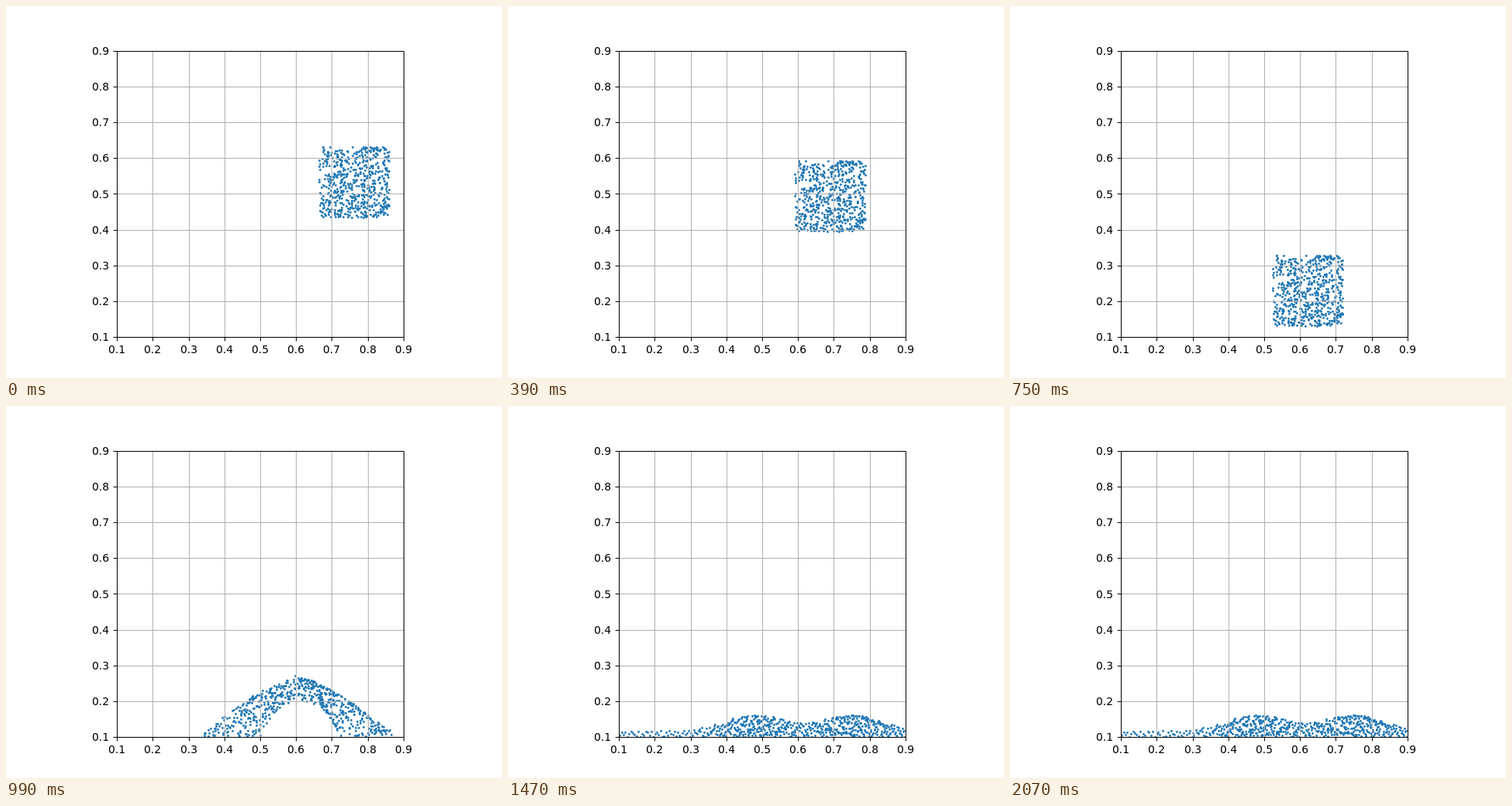
These frames come from a looping animation (640 by 480 pixels, 2100 ms). An HTML page with a canvas:

```html
<!DOCTYPE html>
<html lang="en">
<head>
<meta charset="utf-8">
<title>Falling sand block</title>
<style>
  html, body { margin: 0; width: 640px; height: 480px; overflow: hidden; background: #fff; }
  canvas, svg { position: absolute; left: 0; top: 0; display: block; }
  text { font: 13.89px "DejaVu Sans", sans-serif; fill: #000; }
</style>
</head>
<body>
<canvas id="sand" width="640" height="480"></canvas>
<svg id="axes" width="640" height="480" viewBox="0 0 640 480"></svg>
<script>
const STEP = 30, STEPS = 70, COUNT = 600;
const LEFT = 143.2, TOP = 57.6, SIZE = 369.6, RIGHT = LEFT + SIZE, FLOOR = TOP + SIZE;
const IMPACT = 26, SPLASH = 33, SLIDE = 14;
const BLOCK = { x: 403.3, y: 182, size: 92, vx: -2.6, vy: -3.186, fall: 0.3514 };
const CREST = 376, SPAN = 132;

const mix = (a, b, s) => a + (b - a) * s;
const bell = (x, mid, width) => Math.exp(-(((x - mid) / width) ** 2));
const arch = (x, mid, half, power) => Math.max(0, 1 - Math.abs((x - mid) / half) ** power);

// Axes, drawn above the grains
const axes = document.getElementById('axes');
const snap = v => Math.floor(v + 0.5) + 0.5;

function add(tag, attrs, text = '') {
  const el = document.createElementNS('http://www.w3.org/2000/svg', tag);
  for (const key in attrs) el.setAttribute(key, attrs[key]);
  el.textContent = text;
  axes.append(el);
}

const path = (d, stroke) => add('path', { d, stroke, fill: 'none' });
const x0 = snap(LEFT), x1 = snap(RIGHT), y0 = snap(TOP), y1 = snap(FLOOR);
let grid = '', ticks = '';
for (let i = 0; i <= 8; i++) {
  const x = LEFT + SIZE * i / 8, y = FLOOR - SIZE * i / 8;
  const gx = snap(x), gy = snap(y), label = ((i + 1) / 10).toFixed(1);
  grid += `M${gx} ${y0}V${y1}M${x0} ${gy}H${x1}`;
  ticks += `M${gx} ${y1}v4.86M${x0} ${gy}h-4.86`;
  add('text', { x: Math.round(x - 11), y: 448 }, label);
  add('text', { x: 111, y: Math.round(y + 5.2) }, label);
}
path(grid, '#b0b0b0');
path(ticks, '#000');
path(`M${x0} ${y0}H${x1}V${y1}H${x0}Z`, '#000');

// Heights above the floor: splash surface, hollow below it, settled heap
const surface = x => 79 * arch(x, CREST, SPAN, 1.3);
const hollow = x => 45 * arch(x, 380, 52, 2.6);
const heap = x => 8 + 21 * bell(x, 320, 55) + 22 * bell(x, 447, 54);

let seed = 20731;
function random() {
  seed = (seed + 0x6D2B79F5) | 0;
  let t = Math.imul(seed ^ seed >>> 15, 1 | seed);
  t = t + Math.imul(t ^ t >>> 7, 61 | t) ^ t;
  return ((t ^ t >>> 14) >>> 0) / 4294967296;
}

// The block's lower edge spreads over the floor, its upper edge becomes the crest
const grains = Array.from({ length: COUNT }, () => {
  const u = random(), v = random(), c = 2 * u - 1;
  const low = CREST + SPAN * Math.sign(c) * Math.abs(c) ** 0.85;
  const high = CREST + 66 * c;
  return { u, v, creep: random() < 0.4 ? 0.05 : 0,
           sx: mix(low, high, v),
           sy: FLOOR - mix(hollow(low), surface(high), v) };
});

// Settled places: grains keep their order along x and their rank in each column
const weight = x => heap(x) ** 1.5;
let total = 0;
for (let x = LEFT; x < RIGHT; x += 0.5) total += weight(x);
grains.sort((a, b) => a.sx - b.sx);
let x = LEFT, sum = 0;
grains.forEach((g, i) => {
  while (sum < total * (i + 0.5) / COUNT) {
    sum += weight(x);
    x += 0.5;
  }
  g.fx = x;
});
for (const g of grains) {
  const column = grains.filter(o => Math.abs(o.fx - g.fx) < 10);
  const rank = column.filter(o => o.sy > g.sy).length / column.length;
  g.fy = FLOOR - heap(g.fx) * rank;
}

function flight(g, k) {
  const { x, y, size, vx, vy, fall } = BLOCK;
  return [x + size * g.u + vx * k, y + size * (1 - g.v) + vy * k + fall * k * k];
}

function splash(g, k) {
  const span = SPLASH - IMPACT, s = (k - IMPACT) / span;
  const [x, y] = flight(g, IMPACT);
  const blend = s * s * (3 - 2 * s);
  const enter = s * (1 - s) ** 2 * span * 14.6 * g.v;
  const leave = s * s * (s - 1) * span * 1.6;
  return [mix(x, g.sx, s), mix(y, g.sy, blend) + enter + leave];
}

function settle(g, k) {
  const t = k - SPLASH, s = Math.min(t / SLIDE, 1);
  const ease = 1 - (1 - s) ** 2;
  const y = g.fy > g.sy ? Math.min(g.fy, g.sy + 1.6 * t + BLOCK.fall * t * t)
                        : mix(g.sy, g.fy, ease);
  const loose = g.fx > 170 && g.fx < 425;
  const drift = loose ? g.creep * Math.max(0, t - SLIDE) : 0;
  return [mix(g.sx, g.fx, ease) - drift, y];
}

const ctx = document.getElementById('sand').getContext('2d');
ctx.beginPath();
ctx.rect(LEFT, TOP, SIZE, SIZE);
ctx.clip();
ctx.fillStyle = '#1f77b4';

function draw(k) {
  const place = k <= IMPACT ? flight : k <= SPLASH ? splash : settle;
  ctx.clearRect(0, 0, 640, 480);
  for (const g of grains) {
    const [x, y] = place(g, k);
    ctx.beginPath();
    ctx.arc(Math.floor(x) + 0.5, Math.floor(Math.min(y, FLOOR)) + 0.5, 1.4, 0, Math.PI * 2);
    ctx.fill();
  }
}

const start = performance.now();
function tick() {
  draw(Math.floor((performance.now() - start) / STEP) % STEPS);
  requestAnimationFrame(tick);
}
tick();
</script>
</body>
</html>
```
